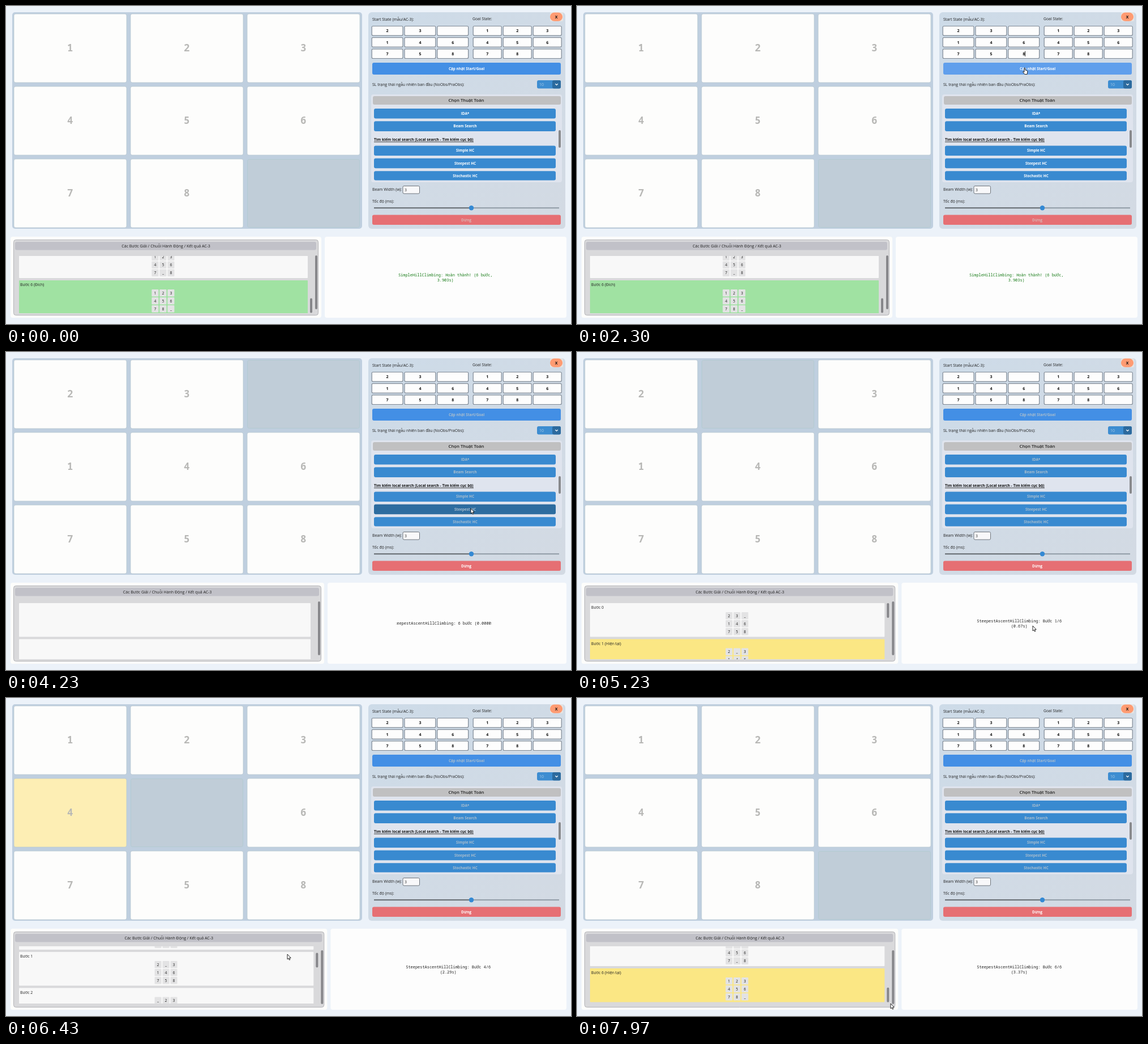
Animation, 998 px wide and 561 px high, one loop 8000 ms. Source, as an HTML page with a canvas:

```html
<!DOCTYPE html>
<html lang="vi">
<head>
<meta charset="utf-8">
<title>8-puzzle solver</title>
<style>
html, body { margin: 0; width: 100%; height: 100%; overflow: hidden; background: #ecf2f9; }
canvas { display: block; width: 998px; height: 561px; }
</style>
</head>
<body>
<canvas id="stage"></canvas>
<script>
const W = 998, H = 561, LOOP = 8000;
const canvas = document.getElementById('stage');
const c = canvas.getContext('2d');
const dpr = window.devicePixelRatio || 1;
canvas.width = W * dpr;
canvas.height = H * dpr;

const SANS = '"Open Sans", "Noto Sans", sans-serif';
const MONO = '"Noto Sans Mono", "DejaVu Sans Mono", monospace';
const START = '23_146758', GOAL = '12345678_';
const STATES = [START, '2_3146758', '_23146758', '123_46758', '1234_6758', '1234567_8', GOAL];

// Timeline in ms
const UPDATE = 2600, RUN = 4100, LISTED = 4270, STEP0 = 4230, STEP = 540, FLASH = 180;
const SMEAR = [6880, 7420];
const ROW = 63.5, ROW_H = 59.5;

// Cursor keys: time, x, y of the tip
const PATH = [
  [1950, 787, 86], [2230, 790, 109], [2750, 790, 109], [3800, 821, 276], [4400, 821, 276],
  [4950, 805, 483], [5300, 805, 483], [5800, 497, 452], [6450, 497, 452], [6780, 548, 461],
  [6860, 548, 461], [7130, 547, 488], [7400, 549, 527], [7650, 554, 539], [8000, 554, 539]
];

const ease = u => u * u * (3 - 2 * u);
const clamp = (v, lo, hi) => Math.max(lo, Math.min(hi, v));
const ramp = (t, a, b) => ease(clamp((t - a) / (b - a), 0, 1));

function box(x0, y0, x1, y1, fill, r = 0, stroke, lw = 1) {
  c.beginPath();
  c.roundRect(x0, y0, x1 - x0, y1 - y0, r);
  if (fill) { c.fillStyle = fill; c.fill(); }
  if (stroke) { c.strokeStyle = stroke; c.lineWidth = lw; c.stroke(); }
}

// y is the middle of the capitals
function text(s, x, y, size, color, { bold, align = 'left', font = SANS } = {}) {
  c.font = `${bold || 400} ${size}px ${font}`;
  c.textAlign = align;
  c.fillStyle = color;
  c.fillText(s, x, y + size * 0.36);
}

function line(x0, y0, x1, y1, color, lw) {
  c.strokeStyle = color;
  c.lineWidth = lw;
  c.beginPath();
  c.moveTo(x0, y0);
  c.lineTo(x1, y1);
  c.stroke();
}

function clipped(x0, y0, x1, y1, draw) {
  c.save();
  c.beginPath();
  c.rect(x0, y0, x1 - x0, y1 - y0);
  c.clip();
  draw();
  c.restore();
}

function cursorAt(t) {
  if (t < PATH[0][0]) return null;
  const i = PATH.findIndex((p, n) => n && t <= p[0]);
  const [t0, x0, y0] = PATH[i - 1], [t1, x1, y1] = PATH[i];
  const drag = t0 >= 6860 && t0 < 7400;
  const u = drag ? (t - t0) / (t1 - t0) : ramp(t, t0, t1);
  return { x: x0 + (x1 - x0) * u, y: y0 + (y1 - y0) * u };
}

function stepAt(t) {
  return clamp(Math.floor((t - STEP0) / STEP), 0, 6);
}

function drawBoard(t) {
  const k = stepAt(t);
  const state = t < UPDATE ? GOAL : STATES[k];
  const flash = k > 0 && t - STEP0 - k * STEP < FLASH ? STATES[k - 1].indexOf('_') : -1;
  box(11, 11, 629, 393, '#bfcfdf', 5);
  for (let i = 0; i < 9; i++) {
    const x = 14 + (i % 3) * 206, y = 14 + Math.floor(i / 3) * 128;
    if (state[i] === '_') {
      box(x + 0.5, y + 0.5, x + 198.5, y + 120.5, '#c0cdd8', 3, '#b0cad0', 0.8);
      continue;
    }
    box(x, y, x + 199, y + 121, i === flash ? '#fdeeb4' : '#fdfdfc', 3, '#b6c6ce', 0.7);
    text(state[i], x + 99.2, y + 60, 17.5, '#b8b8b6', { bold: 700, align: 'center', font: MONO });
  }
}

function drawInputs(x, w, state) {
  for (let i = 0; i < 9; i++) {
    const x0 = x + (i % 3) * (w + 3), y0 = 35.5 + Math.floor(i / 3) * 20.2;
    box(x0, y0, x0 + w, y0 + 16.6, '#fdfdfd', 2, '#7f8995', 1.2);
    if (state[i] !== '_') text(state[i], x0 + w / 2, y0 + 8.4, 7, '#111', { bold: 700, align: 'center' });
  }
}

const ALGOS = [['IDA*', 181, 198.5], ['Beam Search', 203.3, 221], ['Simple HC', 246.4, 264],
  ['Steepest HC', 268.8, 286.3], ['Stochastic HC', 291.2, 307.5]];

const over = (p, x0, y0, x1, y1) => p && p.x >= x0 && p.x <= x1 && p.y >= y0 && p.y <= y1;

function drawControls(t, p) {
  const busy = t >= RUN;
  const dim = '#a9bdcd';
  const mid = { bold: 700, align: 'center' };
  const panel = c.createLinearGradient(640, 11, 988, 393);
  panel.addColorStop(0, '#cddbe8');
  panel.addColorStop(1, '#d3dae3');
  box(640, 11, 988, 393, panel, 6);

  text('Start State (mẫu/AC-3):', 647, 23, 6.95, '#222');
  text('Goal State:', 824, 23, 6.85, '#222');
  box(961, 11, 984, 27, '#e6e4e2', 2);
  box(961, 11.5, 983, 26.8, '#ff9b72', 7.5);
  text('X', 972, 19, 7, '#111', mid);

  drawInputs(646.2, 54.8, START);
  drawInputs(825.2, 50, GOAL);
  if (t < UPDATE && (t + 1000) % 1060 < 530 && t > 50) line(791.5, 79.5, 791.5, 89, '#111', 0.9);

  const hot = !busy && over(p, 647, 100, 980, 121);
  box(647, 100, 980, 121, hot ? '#609fec' : '#438fe5', 3);
  text('Cập nhật Start/Goal', 813.5, 110.5, 6.4, busy ? dim : '#fff', mid);

  text('SL trạng thái ngẫu nhiên ban đầu (NoObs/PraObs):', 647, 138.5, 6.92, '#222');
  box(938, 131, 980, 145.5, '#3d8dd1', 3);
  box(965, 131, 980, 145.5, '#2c6a9e', 3);
  text('10', 942, 138.5, 6.9, '#a9cbe6');
  c.beginPath();
  c.moveTo(970.3, 137.3);
  c.lineTo(972.5, 139.4);
  c.lineTo(974.7, 137.3);
  c.strokeStyle = '#fff';
  c.lineWidth = 1.2;
  c.stroke();

  box(645, 156, 982, 311, '#dfe4ee', 4);
  box(648, 159, 980, 174, '#c0c0c1', 3);
  text('Chọn Thuật Toán', 813, 166.5, 7.7, '#222', { bold: 600, align: 'center' });
  for (const [name, y0, y1] of ALGOS) {
    box(650, y0, 971, y1, over(p, 650, y0, 971, y1) ? '#2d6c9f' : '#398ad0', 3);
    text(name, 811, y0 + 8.7, 6.4, busy ? dim : '#fff', mid);
  }
  text('Tìm kiếm local search (Local search - Tìm kiếm cục bộ)', 650, 236, 6.55, '#111', { bold: 700 });
  line(650, 239.8, 826, 239.8, '#111', 0.8);
  box(976, 219, 980, 250, '#88898c', 2);

  text('Beam Width (w):', 647, 324, 6.85, '#222');
  box(701, 317.5, 730.5, 331, '#f8f8fa', 2, '#6f757c', 1);
  text('3', 704, 324.3, 6.9, '#333');
  text('Tốc độ (ms):', 647, 345, 6.92, '#222');
  line(650, 356.3, 822, 356.3, '#62676d', 2);
  line(822, 356.3, 977, 356.3, '#8f9aa5', 2);
  c.beginPath();
  c.arc(822, 356.3, 4.2, 0, Math.PI * 2);
  c.fillStyle = '#3489d3';
  c.fill();
  box(647, 368.5, 980, 386, '#e66f73', 3);
  text('Dừng', 813, 377.3, 6.6, busy ? '#fff' : '#d9b4b4', mid);
}

function drawRow(i, y, right, current) {
  const goal = i === 6;
  box(23, y, right, y + ROW_H, current ? '#fbe784' : goal ? '#a0e2a2' : '#f8f8f8', 1);
  const note = current ? ' (Hiện tại)' : goal ? ' (Đích)' : '';
  text(`Bước ${i}${note}`, 25, y + 8, 6.9, '#222');
  const cx = (23 + right) / 2 - 0.6;
  [...STATES[i]].forEach((ch, n) => {
    const x = cx + (n % 3 - 1) * 14, cy = y + 22.3 + Math.floor(n / 3) * 14;
    box(x - 6, cy - 6.2, x + 6, cy + 6.2, '#e3e3e4', 1);
    text(ch, x, cy, 6.8, '#222', { align: 'center' });
  });
}

// Streaks left behind while the scroll thumb is dragged quickly
function drawStreaks(s, right, bottom) {
  const i = Math.min(6, Math.ceil(s / ROW)), y = 438 + i * ROW - s, cx = (23 + right) / 2 - 0.6;
  box(23, y - ROW, right, y - 4, '#f8f8f8');
  text(`Bước ${i - 1}`, 25, y - 12, 6.9, '#222');
  text('8', cx + 14, y - 13.5, 6.8, '#222', { align: 'center' });
  box(23, y, right, bottom, '#f8f8f8');
  text(`Bước ${i}`, 25, y + 8, 6.9, '#222');
  c.setLineDash([3, 1.7]);
  for (let q = y + 12.5; q < y + 58; q += 4.9) line(25, q, 46, q, '#444', 0.8);
  c.setLineDash([]);
  for (let q = y + 16; q < bottom; q += 4.2) {
    for (let n = -1; n < 2; n++) line(cx + n * 14 - 5, q, cx + n * 14 + 5, q, '#dcdcde', 1);
    line(cx + 13, q + 1.5, cx + 16, q + 0.5, '#333', 1.1);
  }
  for (let q = y + 61; q < bottom; q += 5.2) line(23, q, right, q, '#d8d8da', 2.4);
}

function scrollAt(t, p) {
  if (t < RUN) return 340;
  if (t < 6860) return 53.5 * ramp(t, 5950, 6300);
  return clamp(53.5 + (p.y - 461) * 4.426, 53.5, 342);
}

function drawLog(t, p) {
  const d = t < RUN ? 0 : t < LISTED ? 5 : 10.3;
  const o = 5 * ramp(t, 5820, 5950);
  const s = scrollAt(t, p), right = 533 + d, k = stepAt(t);
  box(8, 407, 557 + d, 550, '#fdfdfb', 4);
  box(13.5, 412.5, 551.5 + d, 545.5, '#d9d9db', 4, '#b4b4b8', 1);
  box(16, 416, 548 + d, 430.5, '#c1c1c8', 3);
  text('Các Bước Giải / Chuỗi Hành Động / Kết quả AC-3', 282.6 + d / 2, 423.3, 7, '#222', { align: 'center' });
  box(546 + d, 440 + o, 550 + d, 535 + o, '#86868a', 2);

  const top = Math.max(438, 441 - o), bottom = Math.min(542, 544 - o);
  clipped(16, top, 545 + d, bottom, () => {
    if (t >= RUN && t < LISTED) {
      box(23, 443, right, 502.5, '#f8f8f8', 1);
      box(23, 506.5, right, 566, '#f8f8f8', 1);
    } else if (t > SMEAR[0] && t < SMEAR[1]) {
      drawStreaks(s, right, bottom);
    } else {
      for (let i = 0; i < 7; i++) {
        const y = 443 - o + i * ROW - s;
        if (y < bottom && y + ROW > top) drawRow(i, y, right, t >= LISTED && i === k);
      }
    }
  });
  if (t < RUN || t >= LISTED) {
    const y = 443 - o + s * 0.213;
    const held = t > 6800 && t < 7650;
    box(537 + d, y, 541 + d, y + 26, held ? '#5f6064' : '#86868a', 2);
  }

  box(563 + d, 407, 990, 550, '#fdfdfd', 4);
  const mono = { align: 'center', font: MONO };
  if (t < RUN) {
    text('SimpleHillClimbing: Hoàn thành! (6 bước,', 776.2, 474.6, 6.95, '#147a14', mono);
    text('3.903s)', 776.2, 483.4, 6.95, '#147a14', mono);
  } else if (t < LISTED) {
    clipped(689, 470, 858, 490, () =>
      text('SteepestAscentHillClimbing: 6 bước (0.0000s)', 773.5, 478.8, 6.95, '#222', mono));
  } else {
    const secs = (Math.round((0.13 + k * 0.541) * 100 - (k > 4 ? 0.4 : 0)) / 100).toFixed(2);
    text(`SteepestAscentHillClimbing: Bước ${k}/6`, 781.2, 474.6, 6.95, '#222', mono);
    text(`(${secs}s)`, 781.2, 483.4, 6.95, '#222', mono);
  }
}

function drawCursor(t, p) {
  if (!p) return;
  const hand = t < RUN && (over(p, 647, 100, 980, 121) ||
    ALGOS.some(a => over(p, 650, a[1], 971, a[2])));
  c.save();
  c.translate(p.x, p.y);
  const shape = new Path2D(hand
    ? 'M0 .5Q1-.6 1.6 .6L1.8 4 5.2 5Q6 5.4 5.8 7L5 11.5H.8L-2.4 7.4Q-2.2 6-1 6.7L0 7.6Z'
    : 'M0 0V9L2 7.2 3.4 10.2 4.8 9.6 3.5 6.6H6.2Z');
  c.fillStyle = '#fff';
  c.strokeStyle = '#111';
  c.lineWidth = 0.9;
  c.lineJoin = 'round';
  c.fill(shape);
  c.stroke(shape);
  c.restore();
}

function frame(now) {
  const t = now % LOOP, p = cursorAt(t);
  c.setTransform(dpr, 0, 0, dpr, 0, 0);
  box(0, 0, W, H, '#ecf2f9');
  drawBoard(t);
  drawControls(t, p);
  drawLog(t, p);
  drawCursor(t, p);
  requestAnimationFrame(frame);
}
requestAnimationFrame(frame);
</script>
</body>
</html>
```
